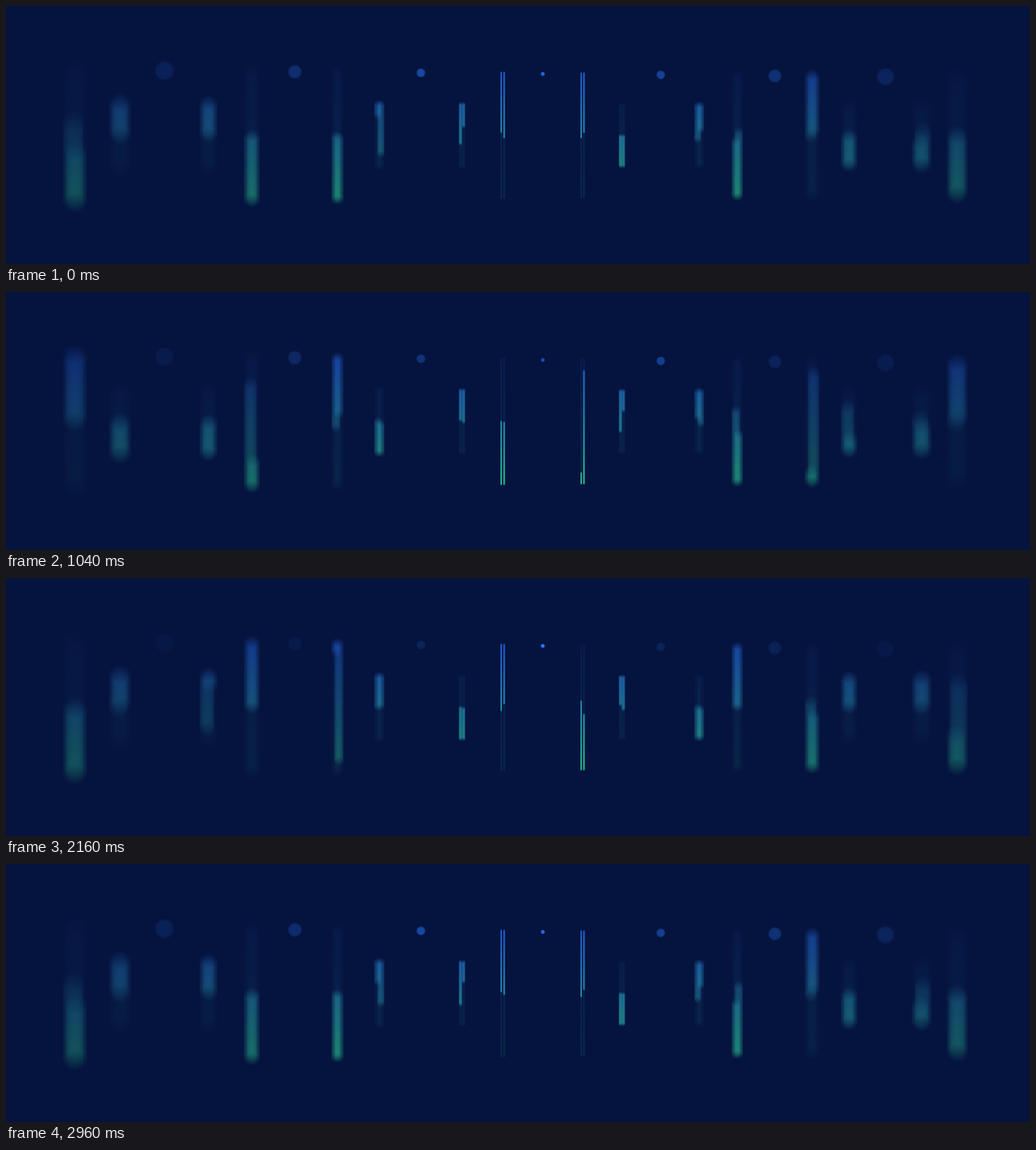
Animation of 1280x323 px, one loop 3 s. Source, as an HTML page with a canvas:

```html
<!DOCTYPE html>
<html lang="en">
<head>
<meta charset="utf-8">
<title>Light bars</title>
<style>
html, body { margin: 0; height: 100%; overflow: hidden; background: #05143e; }
canvas { display: block; }
</style>
</head>
<body>
<canvas id="stage" width="1280" height="323"></canvas>
<script>
const ctx = document.getElementById('stage').getContext('2d');
const LOOP = 3000, MID_X = 671, MID_Y = 162, SIDES = 11;

// when each item, from left to right, falls (bar) or is dimmest (dot)
const phases = [
  1765, 230, 2000, 565, 2650, 2350, 2180, 50, 2050, 1270, 215, 1320,
  1020, 2340, 2450, 1200, 2820, 1900, 1020, 2680, 2000, 2870, 2090
];

// a row of items seen in perspective, in focus only at its centre
const items = phases.map((phase, i) => {
  const u = i - SIDES, scale = 1 / (1 + .0055 * u);
  const dx = 49.95 * u * scale;
  return { u, phase, scale, x: MID_X + dx, blur: .0225 * Math.abs(dx) };
});

const sigmoid = v => 1 / (1 + Math.exp(-v));

// half turns made so far: even rests at the top, odd at the bottom
function turns(t, phase) {
  let sum = 0;
  for (let n = -2; n < 2; n++) {
    const u = t - n * LOOP - phase;
    sum += sigmoid(u * .018) + sigmoid((u - LOOP / 2) * .008);
  }
  return sum % 2;
}

// blue at the top to green at the bottom
function tone(y, alpha) {
  const k = Math.min(1, Math.max(0, (y - 80) / 163));
  return `rgba(${40 + 6 * k}, ${104 + 126 * k}, ${245 - 90 * k}, ${alpha})`;
}

// a thin upright line spread by a round lens blur, one pixel column at a time
function blurredLine(x, y0, y1, radius, alpha) {
  if (y1 - y0 < .1) return;
  for (let px = Math.floor(x - radius); px < x + radius; px++) {
    const h = Math.sqrt(Math.max(0, radius ** 2 - (px + .5 - x) ** 2));
    if (!h) continue;
    const start = y0 - h, size = y1 - y0 + 2 * h;
    const ramp = Math.min(2 * h, y1 - y0);
    const peak = alpha * ramp / (2 * radius);
    const fill = ctx.createLinearGradient(0, start, 0, start + size);
    const stop = (d, a) => fill.addColorStop(d / size, tone(start + d, a));
    stop(0, 0);
    stop(ramp, peak);
    stop(size - ramp, peak);
    stop(size, 0);
    ctx.fillStyle = fill;
    ctx.fillRect(px, start, 1, size);
  }
}

// lit stretch of one side, as fractions along the direction of travel
function litPart(s) {
  const c = (s + 2.5) % 2 - .5;
  return [Math.max(0, c - .5), Math.min(1, c + .5)];
}

function drawBar(t, { u, x, blur, scale, phase }) {
  const half = (u % 2 ? 79 : 39.5) * scale;
  const top = MID_Y - half, bottom = MID_Y + half, gap = 1.8 * scale;
  const alpha = .95 / (.7 + .42 * blur);
  const s = turns(t, phase);
  const [r0, r1] = litPart(s).map(v => top + 2 * half * v);
  const [l1, l0] = litPart(s - 1).map(v => bottom - 2 * half * v);
  for (const [sx, y0, y1] of [[x - gap, l0, l1], [x + gap, r0, r1]]) {
    blurredLine(sx, top, bottom, blur, alpha * .14);
    blurredLine(sx, y0, y1, blur, alpha);
  }
}

// dots brighten quickly and dim slowly
function drawDot(t, { x, blur, scale, phase }) {
  const r = 2.8 + .93 * blur, y = MID_Y - 77 * scale;
  const rise = 800, u = (t - phase + LOOP) % LOOP;
  const k = u < rise ? u / rise : (LOOP - u) / (LOOP - rise);
  const low = .25 + .3 * Math.exp(-blur);
  const level = low + (1 - low) * (1 - Math.cos(Math.PI * k)) / 2;
  const glow = ctx.createRadialGradient(x, y, 0, x, y, r);
  glow.addColorStop(0, '#2a78ff');
  glow.addColorStop(.75, '#2a78ffee');
  glow.addColorStop(1, '#2a78ff00');
  ctx.globalAlpha = level * Math.exp(-blur / 5.4);
  ctx.fillStyle = glow;
  ctx.fillRect(x - r, y - r, 2 * r, 2 * r);
  ctx.globalAlpha = 1;
}

function frame(now) {
  ctx.fillStyle = '#05143e';
  ctx.fillRect(0, 0, 1280, 323);
  for (const item of items) {
    (item.u % 3 ? drawBar : drawDot)(now % LOOP, item);
  }
  requestAnimationFrame(frame);
}
requestAnimationFrame(frame);
</script>
</body>
</html>
```
